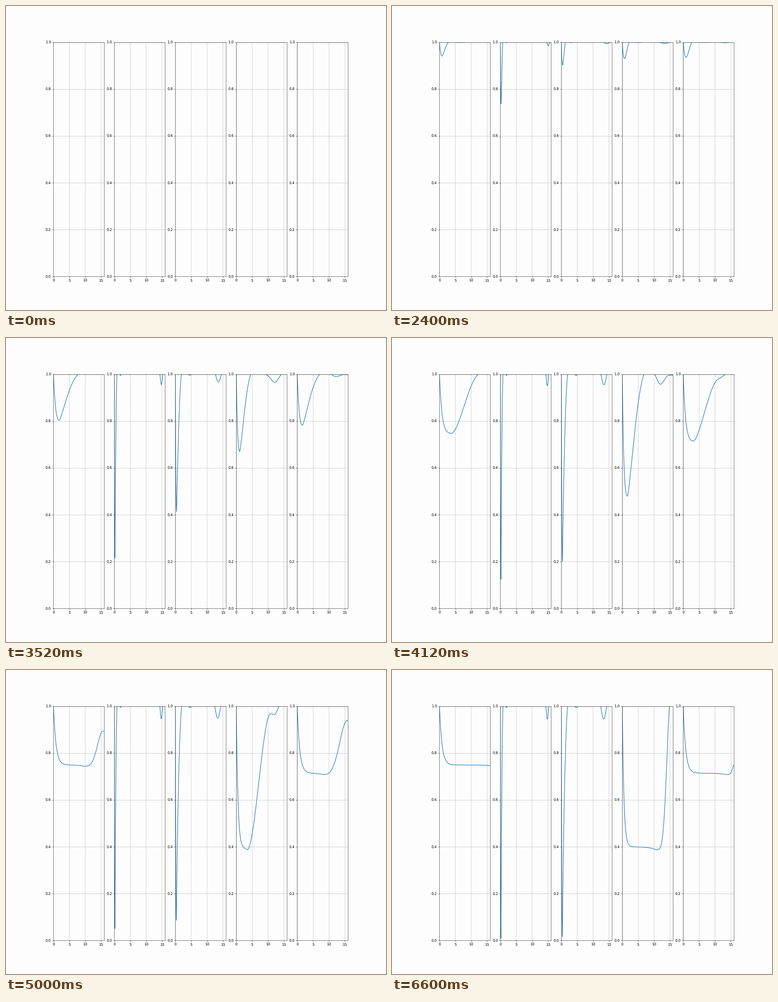
Write a matplotlib script that moves like this. It is 837 by 669 pixels and loops after 6.64 s.

```python
import matplotlib.pyplot as plt
import numpy as np
from matplotlib.animation import FuncAnimation

W, H, DPI = 837, 669, 55.8
STEP, FRAMES = 40, 166
START = 0.24
END_X = 16
X = np.linspace(0, END_X, 1601)

plt.rcParams.update({"path.snap": False, "text.hinting": "none",
                     "axes.linewidth": 0.72, "grid.linewidth": 0.72,
                     "xtick.major.width": 0.72, "ytick.major.width": 0.72})


def logistic(z):
    return 1 / (1 + np.exp(-z))


def glide(a, b, rate, mid):
    """Value that passes smoothly from a to b around time mid."""
    return lambda t: a + (b - a) * logistic(rate * (t - mid))


def settle(span, power):
    """Eased growth from 0 to slightly past 1."""
    def depth(t):
        s = np.clip((t - START) / span, 0, 1) ** power
        return 1.02 * np.sin(np.pi / 2 * s) ** 2
    return depth


def sink(mid):
    """Fast growth at first, then a slow approach to 1."""
    return lambda t: logistic(min(2.3 * (t - mid), 1.1 * (t - mid + 0.5)))


def bell(x, centre, width):
    return np.exp(-0.5 * ((x - centre) / width) ** 2)


class Curve:
    """Decay from 1 to a low point, then a rise whose front moves right.

    low and front give the x of the low point and of the end of the rise,
    end the height it reaches; ripple is a dip at x = far behind the front."""

    def __init__(self, level, tau, depth, low, front,
                 end=lambda t: 1.0, far=12, ripple=0.105):
        self.level, self.tau, self.depth = level, tau, depth
        self.low, self.front, self.end = low, front, end
        self.far, self.ripple = far, ripple

    def fall(self, x0, y0):
        u = np.clip(X / x0, 0, 1)
        k = x0 / self.tau
        tail = np.exp(-k)
        q = (1 - np.exp(-k * u) - k * u * tail) / (1 - tail - k * tail)
        under = max(0, self.level - y0)
        return 1 - min(1 - y0, 1 - self.level) * q - under * u ** (0.45 * x0)

    def rise(self, x0, y0, x1, grown, end):
        v = np.clip((X - x0) / (x1 - x0), 0, None)
        w = np.minimum(0.86 * v ** (2.7 * x0 / x1), 1)
        g = np.sin(np.pi / 2 * w) ** 2
        room = END_X - self.far
        centre = self.far + 0.45 * room * max(0, 1 - grown) ** 2
        dips = (self.ripple * bell(X, centre, 0.29 * room)
                + 0.055 * bell(X, 2.4 * x1, 0.5 * x1))
        return y0 + (end - y0) * g * (1.05 - dips)

    def __call__(self, t):
        if t <= START:
            return np.full_like(X, np.nan)
        grown = self.depth(t)
        x0, y0 = self.low(t), 1 - (1 - self.level) * grown
        x1 = max(self.front(t), x0 + 0.1)
        return np.where(X < x0, self.fall(x0, y0),
                        self.rise(x0, y0, x1, grown, self.end(t)))


curves = [
    Curve(0.75, 0.78, settle(4.05, 1.83), glide(0.6, 18, 1.8, 4.95),
          glide(1.8, 16, 2, 3.7), end=glide(1, 0.75, 4, 5.05), ripple=0),
    Curve(0, 0.1, sink(2.85), glide(0.25, 0.15, 3, 2.4),
          glide(0.7, 0.8, 3, 2.4), far=14.75),
    Curve(0, 0.2, sink(3.37), glide(0.4, 0.33, 3, 3.8),
          glide(0.9, 1.95, 3, 2.6), far=13.35),
    Curve(0.4, 0.5, settle(4.46, 2.1), glide(0.6, 16, 1.32, 6.1),
          glide(1, 16, 1.18, 4.52), far=11.9),
    Curve(0.715, 0.78, settle(4.1, 1.83), glide(0.8, 13.9, 2, 4.85),
          glide(2, 16, 2.1, 3.8), end=glide(1, 0.75, 4.6, 5.2), ripple=0.07),
]

fig, axes = plt.subplots(1, 5, figsize=((W + 1e-4) / DPI, (H + 1e-4) / DPI), dpi=DPI)
fig.set_facecolor("#fdfdfd")
lines = []
for ax in axes:
    ax.set_facecolor("#fdfdfd")
    ax.set(xlim=(0, END_X), ylim=(0, 1), xticks=range(0, END_X, 5))
    ax.grid()
    lines += ax.plot(X, np.full_like(X, np.nan), color="#1f77b4")


def draw(i):
    for line, curve in zip(lines, curves):
        line.set_ydata(curve(i * STEP / 1000))
    return lines


anim = FuncAnimation(fig, draw, frames=FRAMES, interval=STEP, repeat=True,
                     repeat_delay=0, blit=False)
plt.show()
```
